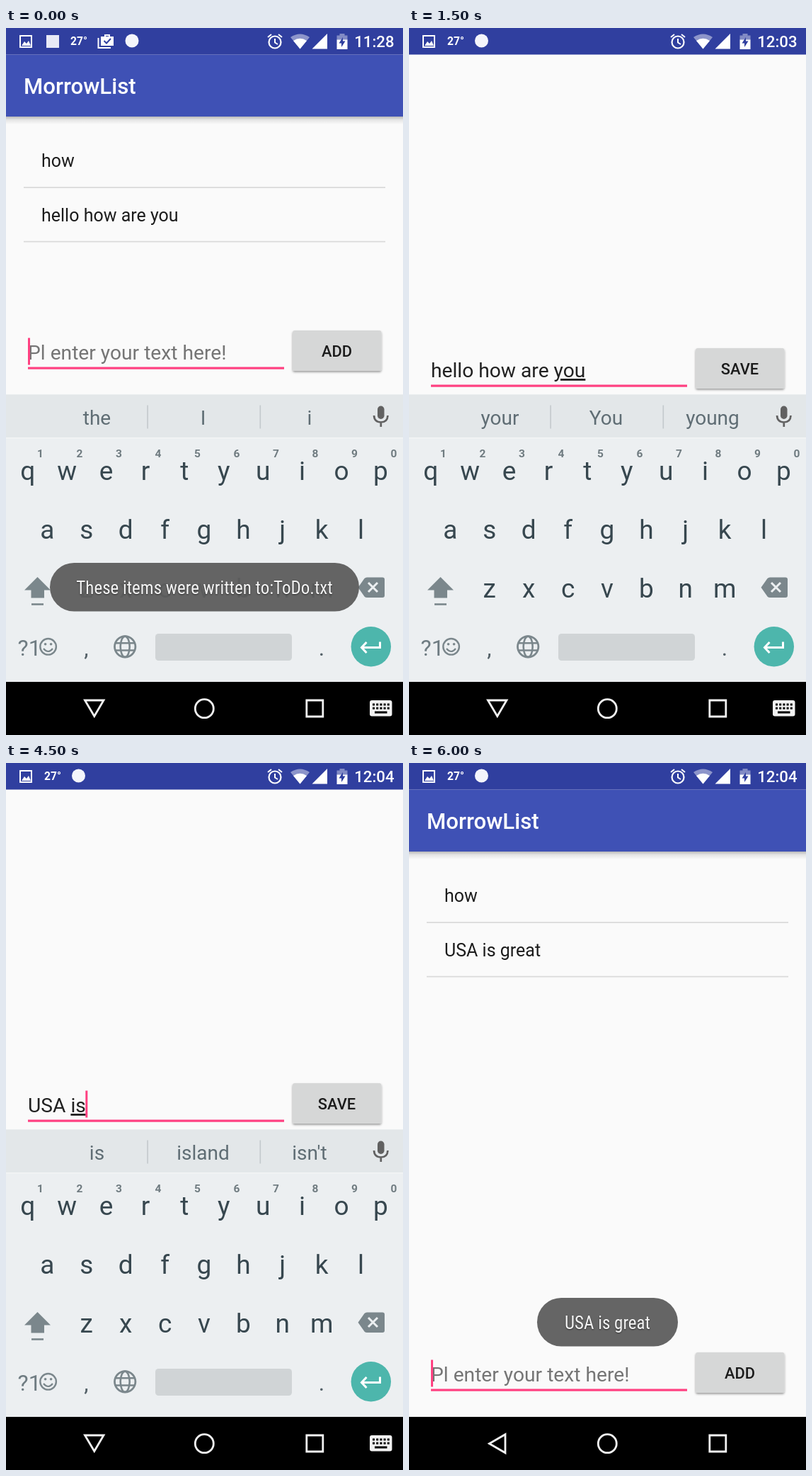
Recreate the animation shown at these times as an HTML page. Size 561 by 998 pixels, loop 6750 ms.

```html
<!DOCTYPE html>
<html lang="en">
<head>
<meta charset="utf-8">
<title>To-do list</title>
<style>
  html, body { margin: 0; width: 100%; height: 100%; overflow: hidden; background: #fafafa; }
  svg { display: block; width: 100%; height: 100%; font-family: Roboto, sans-serif; }
  text { white-space: pre; }
  .mid { text-anchor: middle; }
  .medium { font-weight: 500; }
  .line { fill: none; stroke-width: 3; }
  .composing { text-decoration: underline; text-decoration-skip-ink: none; }
  .toast { font-family: "Roboto Condensed", Roboto, sans-serif; font-stretch: 75%; }
</style>
</head>
<body>
<svg id="stage" viewBox="0 0 561 998" preserveAspectRatio="none"></svg>
<script>
const STEP = 750;
const PINK = '#ff4081';
const stage = document.getElementById('stage');

// dy: offset of the input row; keys: the three keyboard suggestions
const editing = { status: 'image', clock: '12:03', dy: 25, button: 'SAVE' };
const hint = 'Pl enter your text here!';
const scenes = [
  { status: 'full', clock: '11:28', title: 'MorrowList', list: ['how', 'hello how are you'], hint, cursor: true,
    dy: 0, button: 'ADD', keys: ['the', 'I', 'i'], toast: 'These items were written to:ToDo.txt', toastBox: [62, 437] },
  { status: 'short', clock: '12:03', title: 'Edit Item', back: true, text: 'hello how are you', handle: true,
    dy: 405, button: 'SAVE' },
  { ...editing, text: 'hello how are ', composing: 'you', keys: ['your', 'You', 'young'] },
  { ...editing, text: 'hello how are ', cursor: true, keys: ['you', 'the', 'they'] },
  { ...editing, text: 'hello how ', keys: ['to', 'are', 'much'] },
  { ...editing, clock: '12:04', text: '', composing: 'USA', keys: ['USA', 'Usa', 'Usage'] },
  { ...editing, clock: '12:04', text: 'USA ', composing: 'is', cursor: true, keys: ['is', 'island', 'isn\'t'] },
  { ...editing, clock: '12:04', text: 'USA is ', composing: 'great', cursor: true, keys: ['greater', 'greatly', 'greatest'] },
  { status: 'image', clock: '12:04', title: 'MorrowList', list: ['how', 'USA is great'], hint, cursor: true,
    dy: 405, button: 'ADD', toast: 'USA is great', toastBox: [181, 199] },
];

const rect = (x, y, w, h, fill, extra = '') =>
  `<rect x="${x}" y="${y}" width="${w}" height="${h}" fill="${fill}" ${extra}/>`;
const circle = (x, y, r, fill, extra = '') => `<circle cx="${x}" cy="${y}" r="${r}" fill="${fill}" ${extra}/>`;
const path = (d, fill, extra = '') => `<path d="${d}" fill="${fill}" ${extra}/>`;
const line = (d, color, width = 3) => `<path class="line" d="${d}" stroke="${color}" style="stroke-width:${width}"/>`;
const text = (x, y, size, fill, value, cls = '', extra = '') =>
  `<text x="${x}" y="${y}" font-size="${size}" fill="${fill}" class="${cls}" ${extra}>${value}</text>`;

const defs = `<defs>
  <linearGradient id="shade" x2="0" y2="1"><stop stop-opacity=".26"/><stop offset=".4" stop-opacity=".09"/><stop offset="1" stop-opacity="0"/></linearGradient>
  <filter id="lift" x="-10%" y="-10%" width="120%" height="130%"><feDropShadow dx="0" dy="1.8" stdDeviation="1.5" flood-opacity=".38"/></filter>
</defs>`;

function imageIcon() {
  return line('M20 11H36V27H20Z', '#fff', 2) + path('M22 25L26 19L29 22L32 18L35 25Z', '#fff');
}

function statusBar({ status, clock }) {
  const temperatureX = { full: 91, short: 16, image: 54 }[status];
  const dotX = { full: 178, short: 65, image: 102.5 }[status];
  let out = rect(0, 0, 561, 37.5, '#303f9f');
  if (status !== 'short') out += imageIcon();
  if (status === 'full') {
    out += rect(57, 10, 18, 18, '#e8eaf6');
    out += line('M130.5 14V28H148', '#fff', 2) + path('M134 12H139V9H147V12H152V25H134ZM141 11V12H145V11Z', '#fff', 'fill-rule="evenodd"')
      + line('M138.5 18L142 21.5L148 15', '#303f9f', 2);
  }
  out += text(temperatureX, 24, 15.6, '#fff', '27°', '', 'font-weight="700"');
  out += circle(dotX, 18, 9.5, '#f4f5fb');
  out += circle(380, 20, 8.5, 'none', 'stroke="#fff" stroke-width="2.2"')
    + line('M380 15V20.5L384 23M370 13L375 9M390 13L385 9', '#fff', 2);
  out += path('M415.5 29.5L402 13Q415.5 4 429 13Z', '#fff', 'opacity=".45"')
    + path('M415.5 29.5L406 18Q415.5 11.5 425 18Z', '#fff') + path('M432.5 29.5H454V8Z', '#fff');
  out += path('M467.5 10.5H471.5V8H478.5V10.5H482.5V17H467.5Z', '#fff', 'opacity=".4"') + rect(467.5, 16.5, 15, 13.5, '#fff')
    + path('M476 13L470.5 21.5H474V27L479.5 18.5H476Z', '#303f9f');
  return out + text(548.5, 27, 22.2, '#fff', clock, 'medium', 'text-anchor="end"');
}

function appBar({ title, back }) {
  let out = rect(0, 125, 561, 11, 'url(#shade)') + rect(0, 37.5, 561, 87.5, '#3f51b5');
  out += text(back ? 93.5 : 25, 93, 31.2, '#fff', title, 'medium');
  if (back) {
    out += line('M56 81H34M44.5 69.5L33 81L44.5 92.5', '#fff', 3.1);
    out += [69.8, 81, 92.2].map(y => circle(526.7, y, 3.2, '#fff')).join('');
  }
  return out;
}

const listRows = items => items.map((item, i) =>
  text(50, 196.3 + 76.4 * i, 25, '#1c1c1c', item) + rect(25, 224.3 + 76.4 * i, 511, 1.7, '#d9d9d9')).join('');

function inputRow(s) {
  const label = s.hint ? text(31, 468, 28.2, '#757575', s.hint)
    : text(31, 468, 28.2, '#212121', `${s.text}<tspan class="composing">${s.composing || ''}</tspan>`, '', 'id="entry"');
  let out = label + rect(31, 478.5, 362, 3.2, PINK);
  out += rect(405, 427, 125.5, 57, '#d6d7d7', 'rx="3" filter="url(#lift)"');
  out += text(467.5, 463.8, 21.8, '#1b1b1b', s.button, 'mid medium');
  if (s.cursor) out += `<rect id="cursor" x="31" y="437.5" width="3" height="38" fill="${PINK}"/>`;
  if (s.handle) out += path('M250.3 475L261.3 486.2A15.6 15.6 0 1 1 239.3 486.2Z', PINK);
  return `<g transform="translate(0 ${s.dy})">${out}</g>`;
}

function keyRow(letters, x, y) {
  return [...letters].map((c, i) => text(x + 55.4 * i, y, 37, '#37474f', c, 'mid')).join('');
}

function keyboard(suggestions) {
  const gray = '#7b878c';
  let out = rect(0, 517.5, 561, 406, '#eceff1') + rect(0, 517.5, 561, 61, '#e3e7e9') + rect(0, 578, 561, 1.5, '#f3f5f6');
  out += suggestions.map((word, i) => text([128.5, 278.5, 429][i], 560, 28, '#5f6d74', word, 'mid')).join('');
  out += rect(199.3, 532.5, 1.6, 33, '#c3c9cc') + rect(358.5, 532.5, 1.6, 33, '#c3c9cc');
  out += rect(525, 533.5, 9.5, 18.5, '#616161', 'rx="4.7"')
    + line('M520 547Q520.5 556.5 529.8 556.5Q539 556.5 539.5 547M529.8 556V563', '#616161', 2.7);

  out += keyRow('qwertyuiop', 30.8, 638) + keyRow('asdfghjkl', 58.4, 721) + keyRow('zxcvbnm', 113.8, 804);
  out += [...'1234567890'].map((n, i) => text(48.5 + 55.5 * i, 606, 15.5, '#6f7b80', n, 'mid', 'font-weight="700"')).join('');

  out += path('M44.5 775L63 793.5H54V804.5H35.5V793.5H26Z', gray) + rect(36, 812.2, 17, 2.6, gray);
  out += path('M497.5 789.7L506.5 777Q508 775.5 510 775.5H532Q535 775.5 535 778.5V801Q535 804 532 804H510Q508 804 506.5 802.5Z', gray)
    + line('M512 783L525 796M525 783L512 796', '#eceff1', 3);

  out += text(16.5, 885.5, 32, '#6f7c82', '?1');
  out += circle(59.6, 873.3, 11.3, 'none', `stroke="${gray}" stroke-width="2.4"`)
    + circle(55.6, 869.7, 1.8, gray) + circle(63.6, 869.7, 1.8, gray) + line('M53 876Q59.6 884 66 876', gray, 2.2);
  out += text(113.5, 885.5, 32, '#546168', ',', 'mid') + text(446, 885.5, 32, '#546168', '.', 'mid');
  out += circle(168.2, 873.3, 14.7, 'none', `stroke="${gray}" stroke-width="2.8"`)
    + `<ellipse class="line" cx="168.2" cy="873.3" rx="6.5" ry="14.7" stroke="${gray}" style="stroke-width:2.6"/>`
    + line('M155 868.2H181.5M155 878.5H181.5', gray, 2.6);
  out += rect(211, 855, 193, 38, '#d0d4d6', 'rx="4.5"');
  return out + circle(515.8, 873.2, 28.2, '#4db6ac') + line('M528.5 866.5V874.5H503M509.5 867L502.5 874.5L509.5 882', '#fff', 3);
}

function navBar(hasKeyboard) {
  const white = '#f2f2f2';
  let out = rect(0, 923, 561, 75, '#000');
  out += line(hasKeyboard ? 'M111.5 949H138L124.8 971.5Z' : 'M136 947.7V973.7L113.5 960.7Z', white, 2.8);
  out += circle(280.3, 960.7, 13, 'none', `stroke="${white}" stroke-width="2.8"`) + line('M424.8 949H447.8V972H424.8Z', white, 2.8);
  if (hasKeyboard) {
    out += rect(514, 949, 31.5, 22.5, white, 'rx="3"') + rect(521, 964.5, 17.5, 3, '#000');
    for (let i = 0; i < 10; i++) out += rect(518 + (i % 5) * 5.2, 953.5 + Math.floor(i / 5) * 5.2, 3, 3, '#000');
  }
  return out;
}

function toast(message, [x, width]) {
  return rect(x, 755, width, 68.5, '#5d5d5d', 'rx="34.2" opacity=".95"')
    + text(x + width / 2, 798.5, 25, '#f4f4f4', message, 'mid toast', 'style="text-shadow:0 1px 2px #0008"');
}

function draw(s) {
  stage.innerHTML = defs + rect(0, 0, 561, 998, '#fafafa')
    + (s.title ? appBar(s) : '') + statusBar(s)
    + (s.list ? listRows(s.list) : '') + inputRow(s)
    + (s.keys ? keyboard(s.keys) : '') + navBar(!!s.keys)
    + (s.toast ? toast(s.toast, s.toastBox) : '');
  const entry = document.getElementById('entry');
  const cursor = document.getElementById('cursor');
  if (entry && cursor) cursor.setAttribute('x', 30.5 + entry.getComputedTextLength());
}

let shown = -1;
function tick() {
  const index = Math.floor(performance.now() / STEP) % scenes.length;
  if (index !== shown) draw(scenes[shown = index]);
  requestAnimationFrame(tick);
}
tick();
</script>
</body>
</html>
```
